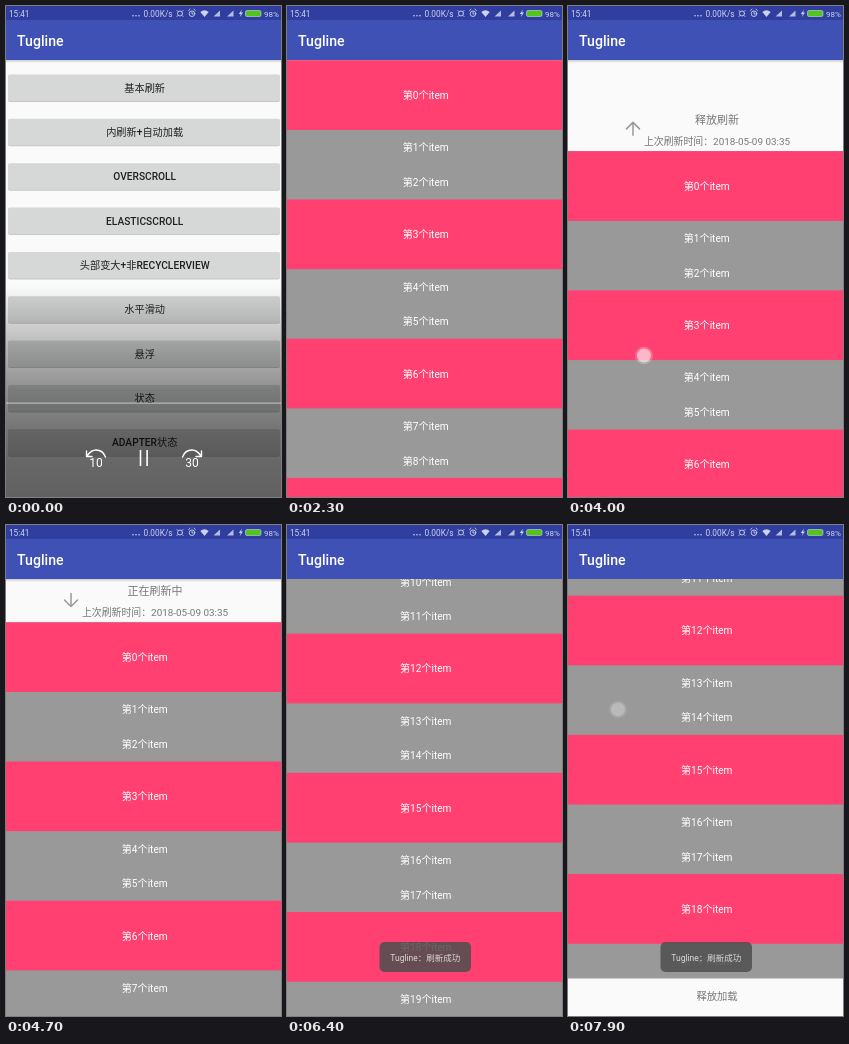
Animation, 275 px wide and 491 px high, one loop 8000 ms. Source, as an HTML page:

```html
<!DOCTYPE html>
<html lang="zh">
<head>
<meta charset="utf-8">
<title>Tugline</title>
<style>
  html, body { margin: 0; width: 100%; height: 100%; overflow: hidden; background: #fafafa; }
  svg { display: block; width: 100%; height: 100%; }
  text { font-family: Roboto, "Noto Sans CJK SC", "Noto Sans CJK", sans-serif; }
  .mid { text-anchor: middle; }
  .medium { font-weight: 500; }
  .line { fill: none; stroke: #fff; stroke-linecap: round; stroke-linejoin: round; }
</style>
</head>
<body>
<svg id="stage" viewBox="0 0 275 491" xmlns="http://www.w3.org/2000/svg"></svg>
<script>
const LOOP = 8000, STEP = 100;
const W = 275, H = 491, BAR_END = 54, MID = 138.7;
const APP = 'Tugline';

// The list: every third row is tall and pink, the others are short and gray.
const LIST_TOP = 54.3, TALL = 69.7, SHORT = 34.75, ITEMS = 20;
const rowTop = i => LIST_TOP + i * SHORT + Math.ceil(i / 3) * (TALL - SHORT);
const LIST_END = rowTop(ITEMS);
const SCROLL_MAX = LIST_END - H - .5;

// Movement of the header and footer pulls.
const DRAG = 92, HEADER = 43, FOOT_DRAG = 30, FOOT_EXTRA = 8;

const label = (x, y, size, fill, str, cls = 'mid', id = '') =>
  `<text id="${id}" class="${cls}" x="${x}" y="${y}" font-size="${size}" fill="${fill}">${str}</text>`;
const rect = (x, y, w, h, fill, extra = '') =>
  `<rect x="${x}" y="${y}" width="${w}" height="${h}" fill="${fill}" ${extra}/>`;
const repeat = (n, make) => Array.from({ length: n }, (_, i) => make(i)).join('');

const appBar = () => rect(0, 14, W, BAR_END - 14, '#3f51b5') + label(11, 40, 14.1, '#fff', APP, 'medium');
const shadow = () => rect(0, BAR_END, W, 3, 'url(#drop)');

function statusBar() {
  const c = '#ccd1ec';
  const signal = x => `<path d="M${x} 10.5h6.5V4.5z" fill="${c}" opacity=".85"/>`;
  return rect(0, 0, W, 14, '#303f9f')
    + label(3, 10.6, 8.2, c, '15:41', '')
    + repeat(3, i => `<circle cx="${127 + 3 * i}" cy="9.8" r=".8" fill="${c}"/>`)
    + label(137.5, 10.6, 8.3, c, '0.00K/s', '')
    + `<g class="line" style="stroke:${c}" stroke-width=".9">
        <circle cx="174" cy="7.5" r="2.5"/>
        <path d="M171 4.5l1 1M177 4.5l-1 1M171 10.500l1-1M177 10.5l-1-1"/>
        <circle cx="186" cy="7.7" r="2.8"/>
        <path d="M186 6v2h1.2M182.6 4.5l1.4-1.3M189.4 4.5l-1.4-1.3"/>
      </g>
      <path d="M198.5 11L194.3 6Q198.5 2.600 202.7 6z" fill="${c}"/>
      <path d="M236 3.500l-3.200 4.500h1.900l-1 3.200 3.300-4.700h-2z" fill="${c}"/>`
    + signal(207.5) + signal(221)
    + rect(239.5, 4.5, 15.5, 6, '#52c41a', `rx="1.5" stroke="${c}" stroke-width=".6"`)
    + label(258, 10.6, 8, c, '98%', '');
}

function homeScreen() {
  const names = ['基本刷新', '内刷新+自动加载', 'OVERSCROLL', 'ELASTICSCROLL',
    '头部变大+非RECYCLERVIEW', '水平滑动', '悬浮', '状态', 'ADAPTER状态'];
  return rect(0, 14, W, H, '#fafafa') + shadow() + names.map((name, i) => {
    const y = 82 + i * 44.35;
    return rect(2, y - 13, 272, 27, '#c6c7c7', 'rx="2"')
      + rect(2, y - 13.5, 272, 26.5, '#d6d7d7', 'rx="2"')
      + label(MID, y + 3.6, 10.2, '#212121', name, 'mid medium');
  }).join('') + appBar();
}

function listRows() {
  return rect(0, LIST_TOP, W, LIST_END - LIST_TOP, '#999') + repeat(ITEMS, i => {
    const y = rowTop(i), h = rowTop(i + 1) - y;
    return (i % 3 ? '' : rect(0, y, W, h, '#ff4070'))
      + label(MID, y + h / 2 + 4, 10.1, '#fff', `第${i}个item`);
  });
}

function listScreen() {
  return rect(0, 14, W, H, '#fafafa')
    + `<g id="head">`
    + label(149, 27, 11, '#777', '', 'mid', 'headText')
    + label(149, 47.7, 9.9, '#777', '上次刷新时间：2018-05-09 03:35')
    + `<g transform="translate(65 32)"><path id="arrow" class="line" style="stroke:#999" stroke-width="1.5"
        d="M0-6.5V6.5M-6.5 0L0 6.5L6.5 0"/></g></g>`
    + shadow()
    + `<g id="list">${listRows()}${label(149, LIST_END + 22, 10.3, '#777', '', 'mid', 'footText')}</g>`
    + appBar();
}

function player() {
  const skip = (x, n, dir) => `<g transform="translate(${x} 452)">
      <path class="line" stroke-width="1.4" transform="scale(${dir} 1)" d="M-9.5-7V-1.5H-4M-9-2Q-5-8 0-8Q7-8 9.5-1"/>
      ${label(0, 9, 12, '#fff', n)}</g>`;
  const pauseBar = x => rect(x, 444, 1.6, 16, '#fff');
  return rect(0, 280, W, H - 280, 'url(#shade)')
    + rect(0, 396.5, W, 1.2, '#fff', 'opacity=".5"')
    + skip(90, '10', 1) + skip(186, '30', -1)
    + pauseBar(133.7) + pauseBar(140.3);
}

const shadeStops = repeat(7, i => {
  const p = i / 6;
  return `<stop offset="${p}" stop-opacity="${.61 * Math.sin(p * Math.PI / 2)}"/>`;
});

document.getElementById('stage').innerHTML = `
  <defs>
    <linearGradient id="shade" x2="0" y2="1">${shadeStops}</linearGradient>
    <linearGradient id="drop" x2="0" y2="1">
      <stop stop-color="#223" stop-opacity=".22"/><stop offset="1" stop-color="#223" stop-opacity="0"/>
    </linearGradient>
  </defs>
  <g id="home">${homeScreen()}</g>
  <g id="page">${listScreen()}</g>
  ${statusBar()}
  <g id="toast">${rect(92.5, 417, 91.5, 30, '#505050', 'rx="5" fill-opacity=".87"')}
    ${label(138.3, 435.5, 8.5, '#dcd6d8', APP + '：刷新成功')}</g>
  <g id="touch"><circle r="9" fill="#fff" opacity=".25"/><circle r="7" fill="#fff" opacity=".7"/></g>
  <g id="player">${player()}</g>`;

const el = {};
for (const node of document.querySelectorAll('[id]')) el[node.id] = node;

const linear = p => p;
const easeOut = p => 1 - (1 - p) ** 2;
const smooth = p => p * p * (3 - 2 * p);

// Progress from 0 to 1 between two times.
const ramp = (t, from, to, ease = linear) =>
  ease(Math.min(1, Math.max(0, (t - from) / (to - from))));
const press = (t, from, to) => ramp(t, from, from + 100) - ramp(t, to, to + 200);
const move = (node, x, y) => node.setAttribute('transform', `translate(${x} ${y})`);

function draw(t) {
  const slide = W * (1 - ramp(t, 600, 1000, easeOut));
  const drag = DRAG * ramp(t, 2400, 4200, easeOut);
  const pull = drag - (DRAG - HEADER) * ramp(t, 4200, 4700, easeOut)
    - HEADER * ramp(t, 4800, 5400, smooth);
  const fling = SCROLL_MAX * ramp(t, 5700, 6400, smooth);
  const over = FOOT_DRAG * ramp(t, 6800, 7600, easeOut) + FOOT_EXTRA * ramp(t, 7700, 7900);

  move(el.home, (slide - W) / 3, 0);
  move(el.page, slide, 0);
  move(el.head, 0, pull);
  move(el.list, 0, pull - fling - over);
  el.head.style.opacity = pull > 0 ? 1 : 0;
  el.headText.textContent = t < 3000 ? '下拉刷新' : t < 4300 ? '释放刷新' : '正在刷新中';
  el.footText.textContent = over < 24 ? '上拉加载' : '释放加载';
  const turn = ramp(t, 2900, 3100) - ramp(t, 4200, 4400);
  el.arrow.setAttribute('transform', `rotate(${180 * turn})`);
  el.toast.style.opacity = ramp(t, 4900, 5200);
  el.player.style.opacity = 1 - ramp(t, 850, 1500);

  const touches = [
    { x: 150, y: 127, on: press(t, 400, 600) },
    { x: 76, y: 195 + drag * 1.7, on: press(t, 2400, 4200) },
    { x: 200, y: 385 - fling, on: press(t, 5700, 5900) },
    { x: 50, y: 249 - over * 1.7, on: press(t, 6800, 7800) },
  ];
  const finger = touches.find(f => f.on > 0);
  el.touch.style.opacity = finger ? .8 * finger.on : 0;
  if (finger) move(el.touch, finger.x, finger.y);
}

const start = performance.now();
function tick() {
  const t = (performance.now() - start) % LOOP;
  draw(Math.floor(t / STEP) * STEP);
  requestAnimationFrame(tick);
}
tick();
</script>
</body>
</html>
```
